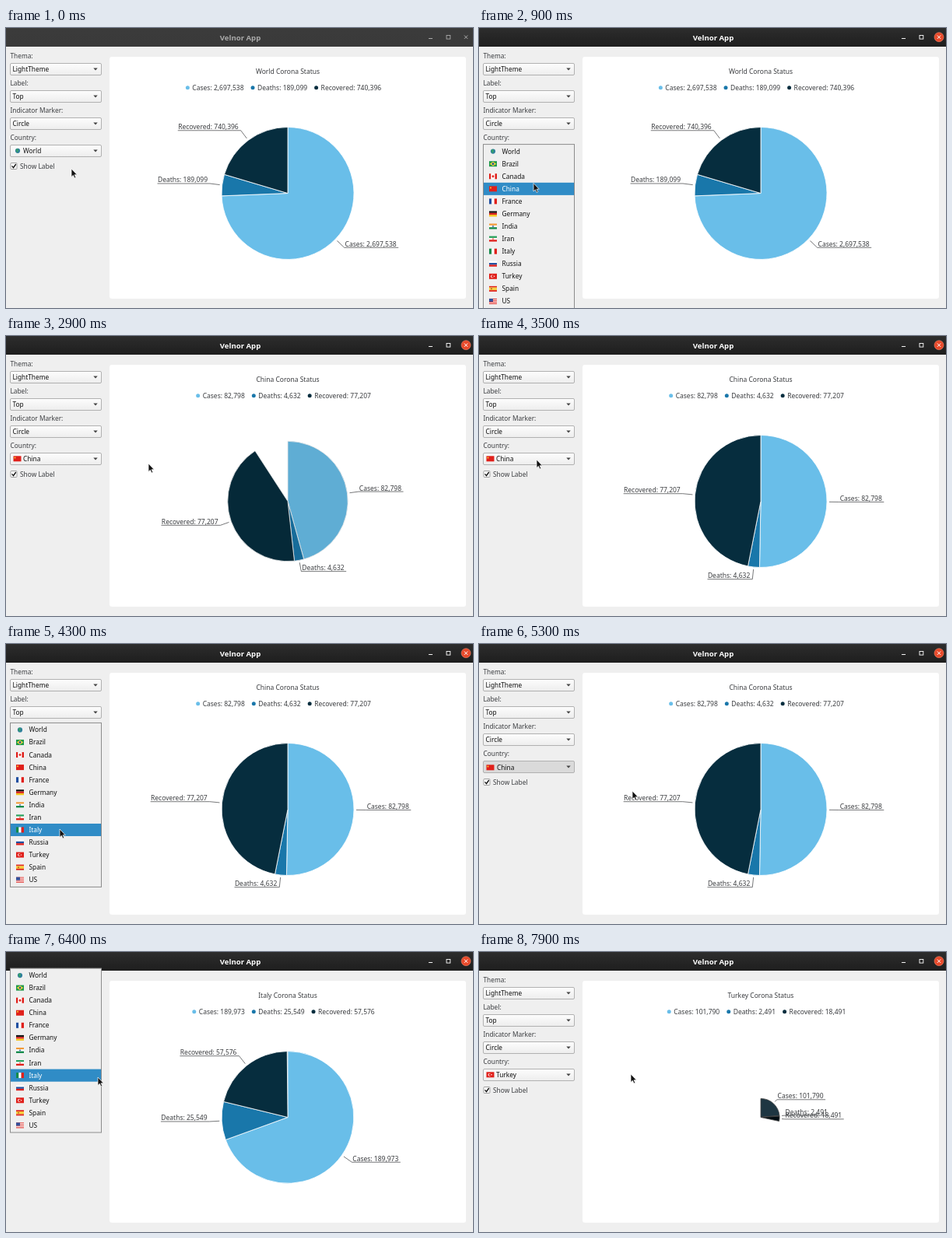
Write an HTML page that moves like this. It is 600 px wide and 360 px high and loops after 8 s.

```html
<!DOCTYPE html>
<html lang="en">
<head>
<meta charset="utf-8">
<title>Velnor App</title>
<style>
  html, body { margin: 0; width: 100%; height: 100%; overflow: hidden; background: #efefef; }
  svg { display: block; width: 600px; height: 360px; font: 8.5px "Noto Sans", "Open Sans", sans-serif; }
</style>
</head>
<body>
<svg id="stage" viewBox="0 0 600 360" xmlns="http://www.w3.org/2000/svg">
  <defs>
    <linearGradient id="bar" x2="0" y2="1"><stop stop-color="#2d2d2d"/><stop offset="1" stop-color="#1e1e1e"/></linearGradient>
    <linearGradient id="barIdle" x2="0" y2="1"><stop stop-color="#3b3b3b"/><stop offset="1" stop-color="#3a3a3a"/></linearGradient>
    <linearGradient id="button" x2="0" y2="1"><stop stop-color="#fdfdfd"/><stop offset="1" stop-color="#ededed"/></linearGradient>
    <clipPath id="labelClip"><rect x="219" width="381" height="360"/></clipPath>
  </defs>
  <g id="scene"></g>
</svg>
<script>
const LOOP = 8000, STEP = 100;
const CX = 362, CY = 212.5, RADIUS = 85, ROW = 16.07;
const COLORS = [[105, 190, 233], [25, 119, 170], [6, 45, 62]];
const INK = '#3b3d40';
const CONTROL = 'font-size="8.3" font-weight="500"';

const DATA = {
  World: [2697538, 189099, 740396],
  China: [82798, 4632, 77207],
  Italy: [189973, 25549, 57576],
  Turkey: [101790, 2491, 18491],
};
const COUNTRIES = ['World', 'Brazil', 'Canada', 'China', 'France', 'Germany', 'India',
  'Iran', 'Italy', 'Russia', 'Turkey', 'Spain', 'US'];

// Each pick: popup opens, popup closes, new data arrives.
const PICKS = [
  { open: 400, close: 1100, load: 2450, name: 'China' },
  { open: 3700, close: 4800, load: 5595, name: 'Italy' },
  { open: 6400, close: 7300, load: 7820, name: 'Turkey' },
];
const FOCUS_AT = 300;

const POINTER = [
  [0, 84, 181], [300, 72, 160], [500, 72, 160], [900, 70, 199.5], [1200, 70, 199],
  [1700, 130, 177], [1900, 130, 177], [2000, 141, 177], [2800, 183, 164], [2900, 183, 164],
  [3500, 74, 159], [3800, 74, 159], [4300, 69, 238], [4700, 69, 238], [4800, 130, 220],
  [4900, 241, 193], [5000, 233, 193], [5100, 233, 193], [5300, 197, 189], [5500, 197, 189],
  [5900, 157, 187], [6300, 118, 161], [6400, 118, 161], [6900, 104, 192], [7000, 104, 192],
  [7100, 86, 189], [7200, 86, 189], [7500, 179, 163], [7600, 179, 163], [7900, 195, 157],
];

const pen = document.createElement('canvas').getContext('2d');
pen.font = '8.5px "Noto Sans", "Open Sans", sans-serif';
const widthOf = s => pen.measureText(s).width;

const rect = (x, y, w, h, fill, extra = '') =>
  `<rect x="${x}" y="${y}" width="${w}" height="${h}" fill="${fill}" ${extra}/>`;
const circle = (x, y, r, fill, extra = '') =>
  `<circle cx="${x}" cy="${y}" r="${r}" fill="${fill}" ${extra}/>`;
const path = (d, fill, extra = '') => `<path d="${d}" fill="${fill}" ${extra}/>`;
const line = (d, color, w) => path(d, 'none', `stroke="${color}" stroke-width="${w}"`);
const text = (x, y, s, fill = INK, extra = '') =>
  `<text x="${x}" y="${y}" fill="${fill}" ${extra}>${s}</text>`;
const rgb = (c, k = 1) => `rgb(${c.map(v => Math.round(v * k))})`;

// Flags are 10 x 7, centred on (x, y).
function bands(vertical, ...colors) {
  const n = colors.length;
  return colors.map((c, i) => vertical
    ? rect(-5 + 10 * i / n, -3.5, 10 / n, 7, c)
    : rect(-5, -3.5 + 7 * i / n, 10, 7 / n, c)).join('');
}
const RED = '#e0201b', GREEN = '#138a4a', WHITE = '#fff', BLUE = '#1f4fa0';
const FLAGS = {
  World: circle(0, 0, 3.1, '#2f7f9d') + path('M-2 -2Q0 -3.4 1 -1.2Q.6 1 -.6 2.6Q-2.6 1 -2 -2Z', '#35a06a'),
  Brazil: bands(0, '#1e9a4a') + path('M-4.2 0L0 -2.9 4.2 0 0 2.9Z', '#f6d53a') + circle(0, 0, 1.4, BLUE),
  Canada: bands(1, RED, WHITE, WHITE, RED) + path('M0 -2L1.6 0 0 2 -1.6 0Z', RED),
  China: bands(0, RED) + circle(-3, -1.4, 1, '#f8d030'),
  France: bands(1, BLUE, WHITE, RED),
  Germany: bands(0, '#111', '#d8201c', '#f4c51c'),
  India: bands(0, '#f29a38', WHITE, GREEN) + circle(0, 0, .9, BLUE),
  Iran: bands(0, '#25a05a', WHITE, RED) + circle(0, 0, .8, RED),
  Italy: bands(1, GREEN, WHITE, RED),
  Russia: bands(0, WHITE, BLUE, RED),
  Turkey: bands(0, RED) + circle(-1, 0, 1.9, WHITE) + circle(-.4, 0, 1.5, RED) + circle(1.6, 0, .7, WHITE),
  Spain: bands(0, RED, '#f6c92e', '#f6c92e', RED) + circle(-2, 0, 1, '#b5602a'),
  US: bands(0, RED, WHITE, RED, WHITE, RED, WHITE, RED) + rect(-5, -3.5, 5, 4, '#33509a'),
};
const flag = (name, x, y) => `<g transform="translate(${x} ${y})">${FLAGS[name]}</g>`;

function titleBar(focused) {
  const fg = focused ? '#fff' : '#aaa';
  return rect(0, 0, 600, 24, focused ? 'url(#bar)' : 'url(#barIdle)')
    + text(301, 15.5, 'Velnor App', fg, 'font-size="9.6" font-weight="700" text-anchor="middle"')
    + line('M543 13.5h5', fg, 1)
    + rect(566, 9.5, 4.8, 4.6, 'none', `stroke="${fg}" stroke-width=".9"`)
    + (focused ? circle(591, 11.7, 6, '#e8492a', 'stroke="#f08a70" stroke-width=".6"') : '')
    + line('M588.8 9.5l4.4 4.4m0 -4.4l-4.4 4.4', fg, 1);
}

function combo(y, value, pressed = false, icon = '') {
  const d = pressed ? 1 : 0;
  return rect(5.5, y - 7.5, 117, 15, pressed ? '#dadada' : 'url(#button)', 'rx="1.5" stroke="#b1b1b1"')
    + icon
    + text((icon ? 22 : 8.5) + d, y + 3 + d, value, '#111', CONTROL)
    + path('M112.3 156.4h5.4l-2.7 3Z', '#444', `transform="translate(0 ${y - 158})"`);
}

function sidebar(country, pressed) {
  const captions = ['Thema:', 'Label:', 'Indicator Marker:', 'Country:'];
  const d = pressed ? 1 : 0;
  return captions.map((s, i) => text(5.5, 39 + 35 * i, s, INK, 'font-size="8.3"')).join('')
    + combo(53, 'LightTheme') + combo(88, 'Top') + combo(123, 'Circle')
    + combo(158, country, pressed, flag(country, country === 'World' ? 15 : 14.5, 157.8 + d))
    + rect(6, 173.5, 8, 8, WHITE, 'stroke="#a0a0a0" rx="1"')
    + line('M7.6 177.4l1.9 2.2 3.2 -4.6', '#111', 1.4)
    + text(18, 181, 'Show Label', INK, 'font-size="8.4"');
}

function legend(entries) {
  const widths = entries.map(widthOf);
  let x = 356 - (widths.reduce((a, b) => a + b) + 3 * 9.5 + 2 * 8) / 2;
  return entries.map((s, i) => {
    const item = circle(x + 3.5, 76.7, 2.5, rgb(COLORS[i])) + text(x + 9.5, 80, s);
    x += widths[i] + 17.5;
    return item;
  }).join('');
}

const polar = (deg, r) => {
  const a = deg * Math.PI / 180;
  return [CX + r * Math.sin(a), CY - r * Math.cos(a)];
};

// Radius, sweep and colour all grow together with p.
function pie(values, entries, p) {
  if (p <= 0) return '';
  const total = values.reduce((a, b) => a + b), r = RADIUS * p;
  let angle = 0, slices = '', labels = '';
  values.forEach((v, i) => {
    const sweep = 360 * p * v / total, mid = angle + sweep / 2;
    slices += path(`M${CX} ${CY}L${polar(angle, r)}A${r} ${r} 0 ${sweep > 180 ? 1 : 0} 1 ${polar(angle + sweep, r)}Z`,
      rgb(COLORS[i], p), `stroke="${rgb([255, 255, 255], p)}" stroke-width=".8" stroke-linejoin="round"`);
    const [x, y] = polar(mid, r * 1.15 + 3);
    const w = widthOf(entries[i]) + 3.4, left = mid >= 180;
    labels += line(`M${polar(mid, r + 3)}L${x} ${y}h${left ? -w : w}`, INK, .7)
      + text(left ? x - w + .4 : x + .9, y - 1.6, entries[i]);
    angle += sweep;
  });
  return slices + `<g ${p < .8 ? 'clip-path="url(#labelClip)"' : ''}>${labels}</g>`;
}

function chart(country, p) {
  const values = DATA[country];
  const entries = ['Cases', 'Deaths', 'Recovered'].map((s, i) => `${s}: ${values[i].toLocaleString('en-US')}`);
  return rect(133, 37, 458, 311, WHITE, 'rx="3"')
    + text(CX, 59, `${country} Corona Status`, INK, 'text-anchor="middle"')
    + legend(entries) + pie(values, entries, p);
}

function popup(current, pointerY) {
  const top = 149.3 - ROW * COUNTRIES.indexOf(current);
  const hot = Math.max(0, Math.min(12, Math.floor((pointerY - top - 1.3) / ROW)));
  return rect(5.5, top + .3, 117, 211, '#efefef', 'stroke="#8c8c8c"')
    + COUNTRIES.map((name, i) => {
      const y = top + 9.3 + ROW * i;
      return (i === hot ? rect(6, y - 8, 116, ROW, '#308cc6') : '')
        + flag(name, 18, y)
        + text(29.5, y + 3, name, i === hot ? WHITE : '#111', CONTROL);
    }).join('');
}

function pointerAt(t) {
  const i = POINTER.findIndex(k => k[0] > t);
  if (i < 0) return POINTER[POINTER.length - 1].slice(1);
  const [t0, x0, y0] = POINTER[i - 1], [t1, x1, y1] = POINTER[i];
  const k = (t - t0) / (t1 - t0);
  return [x0 + (x1 - x0) * k, y0 + (y1 - y0) * k];
}

function draw(t) {
  const loaded = PICKS.filter(p => t >= p.load).pop();
  const busy = PICKS.find(p => t >= p.open && t < p.load);
  const country = loaded ? loaded.name : 'World';
  const u = loaded ? Math.min(1, (t - loaded.load) / 1000) : 1;
  const [x, y] = pointerAt(t);
  return rect(0, 0, 600, 360, '#efefef')
    + titleBar(t >= FOCUS_AT)
    + sidebar(country, !!busy)
    + chart(country, 1 - (1 - u) ** 4)
    + (busy && t < busy.close ? popup(country, y) : '')
    + path('M0 0V10.5L2.4 8.3 4 12 5.7 11.2 4.1 7.7H7.3Z', '#111',
      `transform="translate(${x} ${y})" stroke="#fff" stroke-width=".7"`);
}

const scene = document.getElementById('scene');
const start = performance.now();
let shown = -1;
function tick() {
  const t = Math.floor(Math.max(0, performance.now() - start) % LOOP / STEP) * STEP;
  if (t !== shown) scene.innerHTML = draw(shown = t);
  requestAnimationFrame(tick);
}
tick();
</script>
</body>
</html>
```
